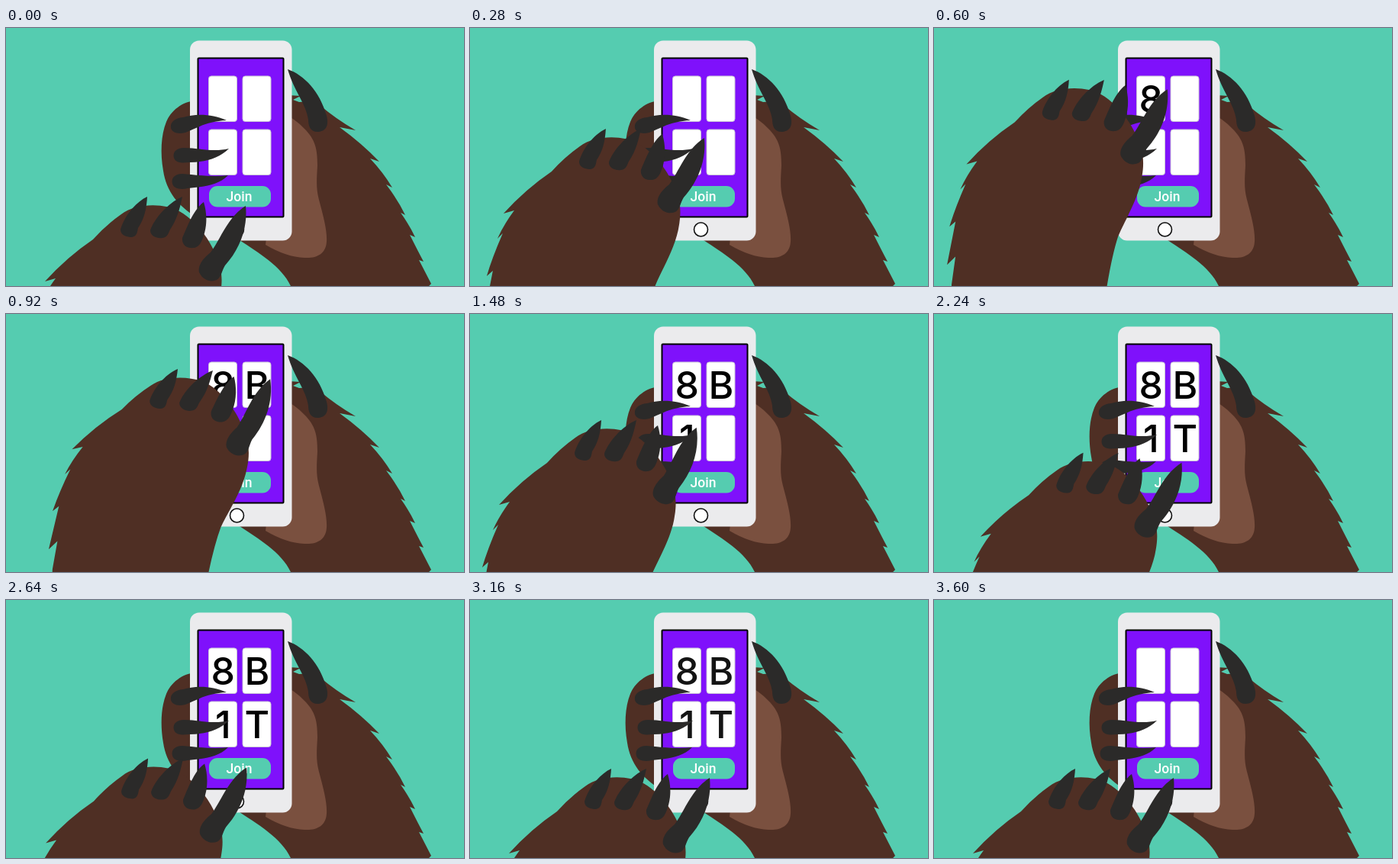
An HTML page for the animation above (3880 ms loop, 600 by 338 pixels).

```html
<!DOCTYPE html>
<html lang="en">
<head>
<meta charset="utf-8">
<title>Join with a code</title>
<style>
  html, body { margin: 0; width: 100%; height: 100%; overflow: hidden; background: #55ccb0; }
  svg { display: block; width: 600px; height: 338px; }
  .fur { fill: #4f2f24; }
  .palm { fill: #7a503f; }
  .claw { fill: #2b2a29; }
  .tile { fill: #fff; stroke: #c9c3d6; stroke-width: 1; }
  #code { font: 500 50px Inter, Roboto, sans-serif; text-anchor: middle; fill: #000; }
  #join { font: 500 17.5px Roboto, Inter, sans-serif; text-anchor: middle; fill: #fff; }
</style>
</head>
<body>
<svg viewBox="0 0 600 338">
  <rect width="600" height="338" fill="#55ccb0"/>

  <!-- holding arm -->
  <path class="fur" d="M306 278 C330 294 361 312 373 338 L554 338 L557 335 L541 304 L547 306
    Q539 291 529 271 L536 274 Q529 259 517 242 L523 245 Q514 226 498 205 L506 209
    Q494 189 477 171 L489 175 Q466 151 437 130 L458 134 Q432 119 411 101
    Q398 96 384 97 L376 94 L386 89 L370 88 L300 100 Z"/>
  <path class="palm" d="M360 110 Q379 119 391 132 C405 146 408 158 408 180 C407 199 406 210 410 225
    C415 244 421 265 420 280 C419 296 407 302 391 301 Q367 300 340 284 Z"/>
  <path class="fur" d="M250 95 C230 96 216 109 210 123 C203 140 202 164 206 187 C210 214 226 234 250 248 Z"/>

  <!-- phone -->
  <rect x="241" y="16.500" width="133.500" height="262" rx="12" fill="#ebebed"/>
  <rect x="251.500" y="39.500" width="112" height="208" rx="1" fill="#7f11fb" stroke="#000" stroke-width="2"/>
  <circle cx="302.500" cy="264" r="9" fill="#fff" stroke="#111" stroke-width="1.600"/>
  <g id="tiles"></g>
  <g id="code"></g>
  <rect x="266" y="207" width="81" height="27.500" rx="11" fill="#55ccb0"/>
  <text id="join" x="305.500" y="227">Join</text>

  <!-- holding claws -->
  <g class="claw">
    <path d="M289 121 C270 112 247 112 232 117 C220 118 215 124 216 131 C218 138 226 139 235 137 C248 132 263 122 289 121 Z"/>
    <path d="M292 158 C271 163 251 157 233 157 C223 157 218 163 220 170 C222 177 231 177 240 176 C260 176 279 171 292 158 Z"/>
    <path d="M291 193 C270 196 247 192 231 191 C221 191 216 197 218 204 C220 211 229 212 238 210 C257 208 277 207 291 193 Z"/>
    <path d="M369 54 C391 62 411 83 420 115 C424 130 417 136 408 136 C399 136 396 129 396 120 C393 99 377 82 369 54 Z"/>
  </g>

  <!-- tapping hand -->
  <g id="hand">
    <path class="fur" d="M32 530 L32 490 L37 453 L26 464 Q31 438 37 407 L29 414 Q36 390 50 358
      L43 365 Q51 347 65 328 L51 332 Q80 300 114 277 Q131 258 151 244 C170 229 208 229 227 240
      C244 249 265 272 275 298 C283 314 284 330 281 347 C277 376 258 406 250 426 Q239 460 230 530 Z"/>
    <g class="claw">
      <path d="M185 221 C168 229 154 249 150 264 C150 272 159 274 165 274 C172 273 172 266 173 262 C181 250 184 238 185 221 Z"/>
      <path d="M231 221 C212 229 194 250 189 265 C189 273 198 276 205 275 C212 274 213 268 215 264 C225 249 228 235 231 221 Z"/>
      <path d="M259 228 C246 237 237 261 231 275 C230 285 238 289 246 288 C254 287 257 278 259 272 C264 257 263 241 259 228 Z"/>
      <path id="thumb" d="M314 233 C290 248 281 277 268 294 C258 302 251 311 253 320 C257 329 267 334 276 330 C282 327 283 317 287 311 C306 290 317 262 314 233 Z"/>
    </g>
  </g>
</svg>
<script>
  const LOOP = 3880, STEP = 40;
  const $ = id => document.getElementById(id);
  const hand = $('hand'), thumb = $('thumb'), code = $('code');
  const svg = (tag, attrs, parent) => {
    const el = document.createElementNS('http://www.w3.org/2000/svg', tag);
    for (const k in attrs) el.setAttribute(k, attrs[k]);
    return parent.appendChild(el);
  };

  const taps = [450, 900, 1420, 1870];
  const glyphs = [...'8B1T'].map((ch, i) => {
    const x = i % 2 ? 310 : 265.5, y = i < 2 ? 63 : 133;
    svg('rect', { class: 'tile', x, y, width: 37, height: 59.5, rx: 3.5 }, $('tiles'));
    const text = svg('text', { x: x + 18.8, y: y + 47.6 }, code);
    text.textContent = ch;
    return text;
  });

  // time, x, y, turn, lift on the way here
  const stops = [
    [0, 0, 0, 0, 0],
    [500, -12, -151, 0, 0],
    [540, -12, -151, 0, 0],
    [900, 40, -149, 2.4, 10],
    [1000, 40, -149, 2.4, 0],
    [1400, -13, -82, 0, 0],
    [1510, -13, -82, 0, 0],
    [1880, 35, -80, 1.6, 0],
    [2000, 35, -80, 1.6, 0],
    [2360, 2, -25, 0, 0],
    [2400, 2, -25, 0, 0],
    [2910, 0, 0, 0, 0],
    [LOOP, 0, 0, 0, 0]
  ];

  const smooth = p => p * p * (3 - 2 * p);

  function pose(t) {
    const i = stops.findIndex(s => s[0] > t);
    const a = stops[i - 1], b = stops[i];
    const s = smooth((t - a[0]) / (b[0] - a[0]));
    const mix = k => a[k] + (b[k] - a[k]) * s;
    return [mix(1), mix(2) - b[4] * Math.sin(Math.PI * s), mix(3)];
  }

  function bend(t) {
    return taps.reduce((sum, tap) => {
      const d = Math.abs(t - tap - 10) / 110;
      return d < 1 ? sum + 5 * Math.cos(d * Math.PI / 2) ** 2 : sum;
    }, 0);
  }

  function draw(t) {
    const [x, y, turn] = pose(t);
    hand.setAttribute('transform', `translate(${x} ${y}) rotate(${turn} 185 221)`);
    thumb.setAttribute('transform', `rotate(${-bend(t)} 265 318)`);
    glyphs.forEach((g, i) => g.setAttribute('visibility', t >= taps[i] ? 'visible' : 'hidden'));
    code.setAttribute('opacity', Math.max(0, Math.min(1, (3600 - t) / 480)));
  }

  const start = performance.now();
  function tick() {
    const t = (performance.now() - start) % LOOP;
    draw(Math.floor(t / STEP) * STEP);
    requestAnimationFrame(tick);
  }
  draw(0);
  requestAnimationFrame(tick);
</script>
</body>
</html>
```
